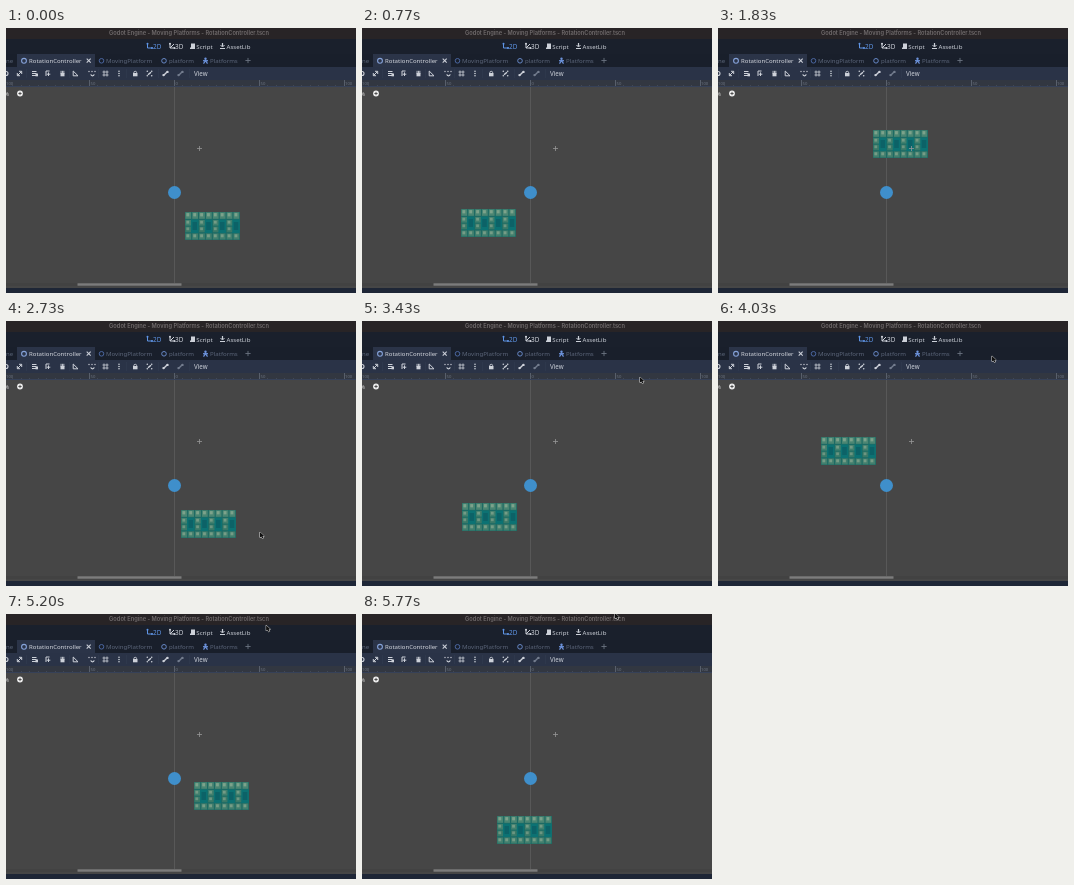
An HTML page with a canvas that plays this animation: 350 by 265 pixels, repeating every 5810 ms.

```html
<!DOCTYPE html>
<html lang="en">
<head>
<meta charset="utf-8">
<title>Rotating platform</title>
<style>
html, body { margin: 0; width: 100%; height: 100%; overflow: hidden; background: #464646; }
canvas { display: block; width: 350px; height: 265px; }
</style>
</head>
<body>
<canvas id="stage"></canvas>
<script>
const W = 350, H = 265, LOOP = 5810;
const canvas = document.getElementById('stage');
const ratio = window.devicePixelRatio || 1;
canvas.width = W * ratio;
canvas.height = H * ratio;
const ctx = canvas.getContext('2d');
ctx.scale(ratio, ratio);

const SANS = '"Noto Sans", "Open Sans", sans-serif';
const LIGHT = '#cdd1d9', DIM = '#5c667a', BLUE = '#5f95e6';
const ORBIT = { x: 168, y: 165, r: 51 };

function box(x, y, w, h, color) {
  ctx.fillStyle = color;
  ctx.fillRect(x, y, w, h);
}

function text(str, x, y, size, color, weight = 400, family = SANS) {
  ctx.font = `${weight} ${size}px ${family}`;
  ctx.fillStyle = color;
  ctx.fillText(str, x, y);
}

function path(points, color, width = 1) {
  ctx.beginPath();
  points.forEach(([x, y], i) => i ? ctx.lineTo(x, y) : ctx.moveTo(x, y));
  ctx.strokeStyle = color;
  ctx.lineWidth = width;
  ctx.stroke();
}

function ring(x, y, r, color, width = 1, from = 0, to = Math.PI * 2) {
  ctx.beginPath();
  ctx.arc(x, y, r, from, to);
  ctx.strokeStyle = color;
  ctx.lineWidth = width;
  ctx.stroke();
}

function dot(x, y, r, color) {
  ctx.beginPath();
  ctx.arc(x, y, r, 0, Math.PI * 2);
  ctx.fillStyle = color;
  ctx.fill();
}

function plus(x, y, r, color, width = 1) {
  path([[x - r, y], [x + r, y]], color, width);
  path([[x, y - r], [x, y + r]], color, width);
}

function person(x, y, color) {
  dot(x, y - 2, 1.2, color);
  path([[x - 2.5, y], [x + 2.5, y]], color, 1.2);
  path([[x - 2, y + 3], [x, y], [x + 2, y + 3]], color, 1.2);
}

function bone(x, y, color) {
  path([[x - 2, y + 2], [x + 2, y - 2]], color, 1.4);
  dot(x - 2, y + 1.6, 1.2, color);
  dot(x + 2, y - 1.6, 1.2, color);
}

function axes(x, y, color) {
  path([[x, y - 3], [x, y + 2], [x + 5, y + 2]], color, 1);
  dot(x, y - 2.3, 1, color);
  dot(x + 4.5, y + 2, 1, color);
}

function header() {
  box(0, 0, W, 11, '#282426');
  ctx.textAlign = 'center';
  text('Godot Engine - Moving Platforms - RotationController.tscn', 183, 7, 5.7,
    '#706b6c', 600, 'Inter, "Open Sans", sans-serif');
  ctx.textAlign = 'left';

  box(0, 11, W, 15, '#1a202c');
  axes(141.5, 18, BLUE);
  text('2D', 147, 20.5, 6.4, BLUE);
  axes(164, 18, LIGHT);
  path([[164, 20], [168, 16]], LIGHT, 1);
  text('3D', 169, 20.5, 6.4, LIGHT);
  box(185, 15.5, 4, 5.5, LIGHT);
  box(184, 19.5, 4, 1.5, LIGHT);
  text('Script', 190.3, 20.5, 6.1, LIGHT);
  path([[216.5, 15], [216.5, 18.5]], LIGHT, 1.2);
  path([[214.5, 17], [216.5, 19], [218.5, 17]], LIGHT, 1);
  path([[214, 20.5], [219, 20.5]], LIGHT, 1);
  text('AssetLib', 220.5, 20.5, 6.1, LIGHT);
}

function tabs() {
  box(0, 26, W, 13, '#191f2b');
  box(11, 26, 78, 13, '#2b3448');
  text('ne', 0, 35, 6, DIM);
  ring(18, 32.8, 2.4, '#86a3da', 1.1);
  text('RotationController', 23, 35, 6.05, '#d5d8df');
  path([[80.7, 30.7], [84.7, 34.7]], LIGHT, 1.1);
  path([[84.7, 30.7], [80.7, 34.7]], LIGHT, 1.1);
  ring(95.5, 32.8, 2.3, '#4a66a0');
  text('MovingPlatform', 100, 35, 6.1, DIM);
  ring(158, 32.8, 2.3, '#6687c5');
  text('platform', 163, 35, 6.1, DIM);
  person(199.5, 32.7, '#6d93dc');
  text('Platforms', 204, 35, 6.1, DIM);
  plus(242, 32.5, 2.6, '#6a7280', 0.9);
}

function toolbar() {
  const y = 45.5;
  box(0, 39, W, 13, '#2a3347');
  ring(0, y, 2, LIGHT, 1.1);
  path([[11.5, y + 2], [15.5, y - 2]], LIGHT);
  path([[13, y - 2.2], [15.7, y - 2.2], [15.7, y + 0.5]], LIGHT);
  path([[11.3, y - 0.5], [11.3, y + 2.2], [14, y + 2.2]], LIGHT);
  for (let i = 0; i < 3; i++) box(26, y - 2.5 + i * 2, 4.5, 1, LIGHT);
  box(29.5, y, 2.5, 2.8, LIGHT);
  path([[40, y + 2.5], [40, y - 2.5], [43.5, y - 2.5]], LIGHT);
  plus(42.5, y + 0.7, 1.8, LIGHT);
  // pan hand
  box(54.5, y - 0.5, 4, 3.3, LIGHT);
  for (let i = 0; i < 3; i++) box(54.6 + i * 1.4, y - 2.7, 0.9, 3, LIGHT);
  path([[67.2, y - 2.5], [72, y + 2.3], [67.2, y + 2.3], [67.2, y - 2.5]], LIGHT, 1);
  ring(86.5, y + 0.8, 1.6, LIGHT, 1.1, 0, Math.PI);
  for (const dx of [-3, 0, 3]) dot(86 + dx, y - 2, 0.7, LIGHT);
  for (const d of [-1.5, 1.5]) {
    path([[96.5, y + d], [102.5, y + d]], LIGHT, 0.8);
    path([[99.5 + d, y - 3], [99.5 + d, y + 3]], LIGHT, 0.8);
  }
  for (let i = -1; i < 2; i++) dot(113, y + i * 2.2, 0.8, LIGHT);
  box(127, y - 0.5, 4.5, 3.3, LIGHT);
  ring(129.25, y - 0.8, 1.4, LIGHT, 0.9);
  for (const dx of [-2.2, 2.2]) {
    for (const dy of [-2.2, 2.2]) dot(143.5 + dx, y + dy, 0.8, LIGHT);
  }
  path([[142, y + 1.3], [145, y - 1.3]], LIGHT, 1.5);
  bone(159.5, y, LIGHT);
  bone(174.5, y, '#737c8e');
  for (const x of [20, 63, 92, 120, 152, 183]) box(x, 41, 0.6, 9, '#333c50');
  text('View', 188, 48, 6.2, LIGHT);
}

function ruler() {
  box(0, 52, W, 7, '#323741');
  for (let i = -20; i <= 20; i++) {
    const x = Math.round(168.5 + i * 8.5) - 0.5;
    const big = i % 10 === 0;
    path([[x, big ? 52 : 57], [x, 59]], big ? '#69717f' : '#4b525e', 0.7);
  }
  [['100', 0], ['50', 84.5], ['0', 169.5], ['50', 254.5], ['100', 339]]
    .forEach(([label, x]) => text(label, x, 56.5, 4.2, '#6d7582'));
  box(0, 58, W, 1, '#364158');
}

function view() {
  box(0, 59, W, 201, '#464646');
  box(168, 59, 1, 199, '#585858');
  text('%', -1.5, 67.5, 5.5, '#c8c8c8');
  dot(14, 65.5, 2.9, '#f0f0f0');
  plus(14, 65.5, 1.6, '#464646', 0.9);
}

function bottom() {
  box(0, 255, W, 3, '#424242');
  box(71.5, 255.3, 104, 2.4, '#7c7c7c');
  box(0, 260, W, 5, '#1e2636');
}

function tile(x, y, w, h, color, shine) {
  box(x, y, w, h, color);
  box(x + 1, y + 0.8, w * 0.5, h * 0.5, shine);
}

function platform(cx, cy) {
  ctx.save();
  ctx.translate(Math.round(cx - 27.5), Math.round(cy - 14));
  box(0, 0, 55, 28, '#1d6a64');
  for (let i = 0; i < 8; i++) {
    const x = i * 6.875;
    tile(x + 0.4, 0.3, 5.7, 6.5, '#4b8673', '#7ca28b');
    tile(x + 0.4, 21.5, 5.7, 6, '#427f6e', '#759c86');
  }
  for (let i = 0; i < 4; i++) {
    const x = i * 13.75;
    box(x + 5.5, 7.5, 8, 13.5, '#0c7273');
    box(x + 7.5, 10, 4.5, 8, '#0c6267');
    tile(x + 0.4, 8, 5.6, 5.6, '#42806e', '#739b86');
    tile(x + 0.4, 14.6, 5.6, 5.6, '#397968', '#6c9581');
  }
  ctx.restore();
}

// time, x, y of the pointer tip
const POINTER = [
  [2470, 345, 259], [2730, 254, 211], [3030, 260, 165], [3430, 278, 56],
  [4000, 274, 35], [4630, 271, 27], [5400, 258, 8], [5770, 253, -1]
];

function pointer(t) {
  if (t < POINTER[0][0]) return;
  let i = 0;
  while (i < POINTER.length - 2 && t >= POINTER[i + 1][0]) i++;
  const [t0, x0, y0] = POINTER[i], [t1, x1, y1] = POINTER[i + 1];
  const u = Math.min(1, (t - t0) / (t1 - t0));
  const k = u * u * (3 - 2 * u);
  ctx.save();
  ctx.translate(x0 + (x1 - x0) * k, y0 + (y1 - y0) * k);
  ctx.beginPath();
  [[0, 0], [0, 5.6], [1.4, 4.5], [2.4, 6.6], [3.4, 6.1], [2.5, 4.1], [4.2, 4]]
    .forEach(([x, y]) => ctx.lineTo(x, y));
  ctx.closePath();
  ctx.fillStyle = '#101010';
  ctx.strokeStyle = '#dcdcdc';
  ctx.lineWidth = 1;
  ctx.stroke();
  ctx.fill();
  ctx.restore();
}

const startOf = n => Math.round(n * 10 / 3) * 10;

function draw(now) {
  const t = now % LOOP;
  let n = Math.floor(t * 0.03) + 1;
  while (startOf(n) > t) n--;
  const time = startOf(n);
  const angle = (41 + 0.1344 * time) * Math.PI / 180;

  view();
  platform(ORBIT.x + ORBIT.r * Math.cos(angle), ORBIT.y + ORBIT.r * Math.sin(angle));
  dot(168.5, 164.5, 6.5, '#3f8fcb');
  plus(193.5, 120.5, 2.5, '#969696', 0.8);
  header();
  tabs();
  toolbar();
  ruler();
  bottom();
  pointer(time);
}

const begin = performance.now();
function tick() {
  draw(performance.now() - begin);
  requestAnimationFrame(tick);
}
tick();
</script>
</body>
</html>
```
